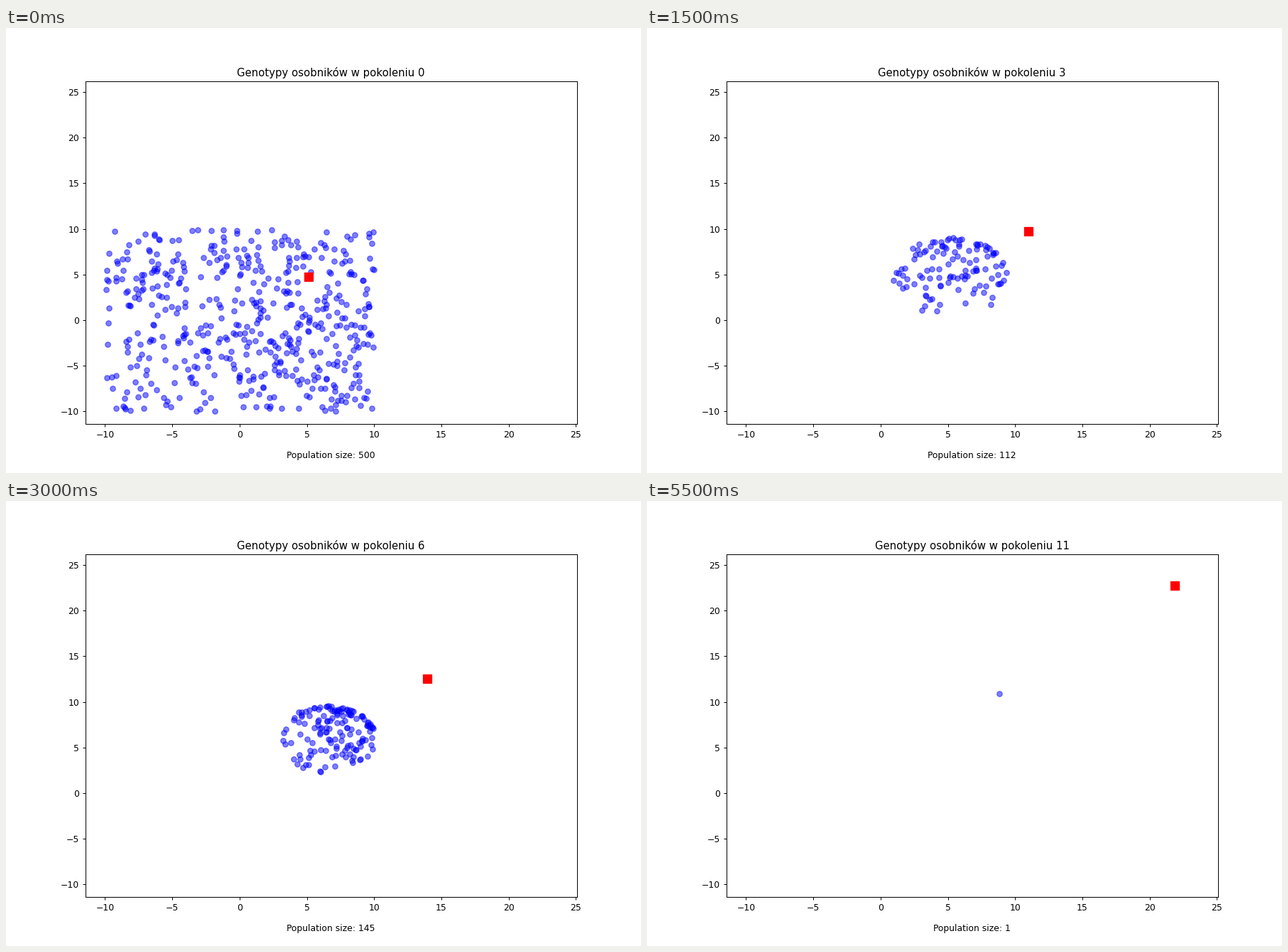
Write a matplotlib script that moves like this. It is 894 by 626 pixels and loops after 6000 ms.

```python
import matplotlib.pyplot as plt
import numpy as np
from matplotlib.animation import FuncAnimation

GENERATIONS = 12
DPI = 89.4

# Key generations; everything in between is interpolated.
KEYS = [0, 1, 3, 5, 7, 9, 11]
SIZE = [500, 53, 112, 193, 98, 127, 1]
BEST_X = [5.12, 7.58, 10.97, 11.54, 16.3, 17.91, 21.87]
BEST_Y = [4.74, 7.51, 9.75, 10.3, 14.84, 17.5, 22.73]

# The selected cloud: centre and radius.
CLOUD_KEYS = [1, 5, 7, 9, 11]
CLOUD_X = [4.8, 5.5, 7.45, 7.2, 8.8]
CLOUD_Y = [4.6, 4.8, 7.0, 7.35, 10.93]
CLOUD_RADIUS = [4.0, 4.7, 2.6, 3.1, 0]
LEAN = np.array([0.25, 0.45])


def population(generation, size):
    rng = np.random.default_rng(generation)
    if generation == 0:
        return rng.uniform(-10, 10, (size, 2))
    x, y, radius = (np.interp(generation, CLOUD_KEYS, track)
                    for track in (CLOUD_X, CLOUD_Y, CLOUD_RADIUS))
    reach = rng.random((size, 1)) ** 0.55
    angle = rng.uniform(0, 2 * np.pi, (size, 1))
    disc = reach * np.hstack([np.cos(angle), np.sin(angle)])
    # Inner points lean towards the optimum, the rim stays in place.
    return (x, y) + radius * (disc + LEAN * (1 - reach ** 2))


fig, ax = plt.subplots(figsize=(894.01 / DPI, 626.01 / DPI), dpi=DPI)
fig.subplots_adjust(right=0.899)
ax.set_xlim(-11.465, 25.07)
ax.set_ylim(-11.43, 26.19)
individuals = ax.scatter([], [], color="blue", alpha=0.5)
best = ax.scatter([], [], color="red", marker="s", s=100)
title = ax.set_title("")
caption = ax.text(0.5, -0.1, "", transform=ax.transAxes, ha="center")


def update(generation):
    size, best_x, best_y = (np.interp(generation, KEYS, track)
                            for track in (SIZE, BEST_X, BEST_Y))
    individuals.set_offsets(population(generation, int(size)))
    best.set_offsets([(best_x, best_y)])
    title.set_text(f"Genotypy osobników w pokoleniu {generation}")
    caption.set_text(f"Population size: {int(size)}")
    return individuals, best, title, caption


animation = FuncAnimation(fig, update, frames=GENERATIONS, interval=500,
                          repeat=True, repeat_delay=0)
plt.show()
```
